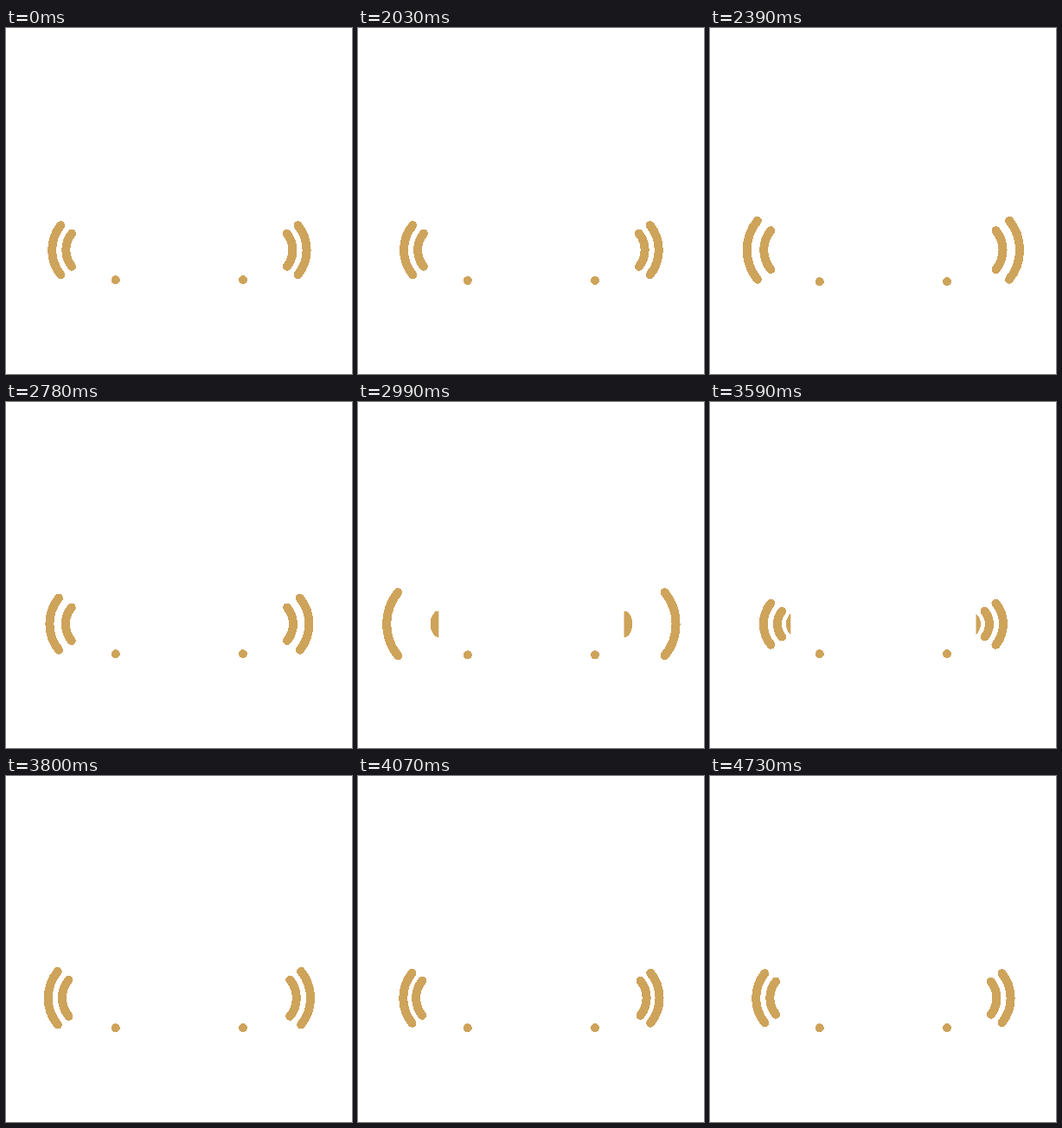
Recreate the animation shown at these times as an HTML page. Size 400 px wide and 400 px high, loop 4.79 s.

```html
<!DOCTYPE html>
<html lang="en">
<head>
<meta charset="utf-8">
<title>Sound waves</title>
<style>
  html, body { margin: 0; width: 100%; height: 100%; overflow: hidden; background: #fff; }
  svg { display: block; width: 100vw; height: 100vh; shape-rendering: crispEdges; }
  path { fill: none; stroke: #cea35a; stroke-width: 10; stroke-linecap: round; }
  circle { fill: #cea35a; }
</style>
</head>
<body>
<svg viewBox="0 0 400 400">
  <defs>
    <clipPath id="outside"><rect width="93.3" height="400"/></clipPath>
    <g id="side">
      <g id="waves" clip-path="url(#outside)"></g>
      <circle id="dot" cx="126.8" cy="291.2" r="5"/>
    </g>
  </defs>
  <use href="#side"/>
  <use href="#side" transform="translate(400.8 0) scale(-1 1)"/>
</svg>
<script>
const LOOP = 4790, START = 2000, BEAT = 260, BEATS = 6;
const MID_Y = 256.7, ORIGIN_X = 108, HIDDEN_X = 104, EDGE_X = 20, TRAVEL = 495;
const SETTLE = 3590;
const OUTER = 0.52, INNER = 0.49;

// A wave leaves the body at a given time and runs out to the edge.
const pulse = (time, spread) => ({ spread, steps: [[time, HIDDEN_X], [time + TRAVEL, EDGE_X]] });

const waves = [
  { spread: OUTER, steps: [[0, 53.2], [2030, 53.2], [2240, EDGE_X]] },
  { spread: INNER, steps: [[0, 69.3], [2030, 69.3], [2340, EDGE_X]] },
  pulse(2030, OUTER), pulse(2145, INNER),
  pulse(2465, OUTER), pulse(2574, INNER),
  pulse(2900, OUTER), pulse(3041, INNER),
  { spread: OUTER, steps: [[3343, HIDDEN_X], [SETTLE, 62], [3770, 48.2], [4300, 53.2], [LOOP, 53.2]] },
  { spread: INNER, steps: [[3437, HIDDEN_X], [SETTLE, 78], [3800, 65], [4730, 69.3], [LOOP, 69.3]] },
  { spread: INNER, steps: [[3525, HIDDEN_X], [SETTLE, 93], [3640, 91], [3760, HIDDEN_X]] }
];

const dot = document.getElementById("dot");
const group = document.getElementById("waves");
for (const wave of waves) {
  wave.path = document.createElementNS("http://www.w3.org/2000/svg", "path");
  group.append(wave.path);
}

const easeOut = u => 1 - (1 - u) ** 2;

function positionAt(steps, time) {
  const next = steps.findIndex(step => step[0] > time);
  if (next < 1) return null;
  const [t0, x0] = steps[next - 1], [t1, x1] = steps[next];
  const u = (time - t0) / (t1 - t0);
  return x0 + (x1 - x0) * (t0 >= SETTLE ? easeOut(u) : u);
}

function arc(x, spread) {
  const half = spread * (ORIGIN_X - x), radius = 1.586 * half, endX = x + 0.355 * half;
  return `M${endX} ${MID_Y - half}A${radius} ${radius} 0 0 0 ${endX} ${MID_Y + half}`;
}

function draw(time) {
  for (const { path, steps, spread } of waves) {
    const x = positionAt(steps, time);
    path.setAttribute("d", x === null ? "" : arc(x, spread));
  }
  const beat = (time - START) / BEAT;
  const bouncing = time >= 2030 && beat < BEATS;
  dot.setAttribute("cy", 291.2 + (bouncing ? 2 * Math.abs(Math.sin(Math.PI * beat)) : 0));
}

const begin = performance.now();
function frame() {
  draw((performance.now() - begin) % LOOP);
  requestAnimationFrame(frame);
}
frame();
</script>
</body>
</html>
```
